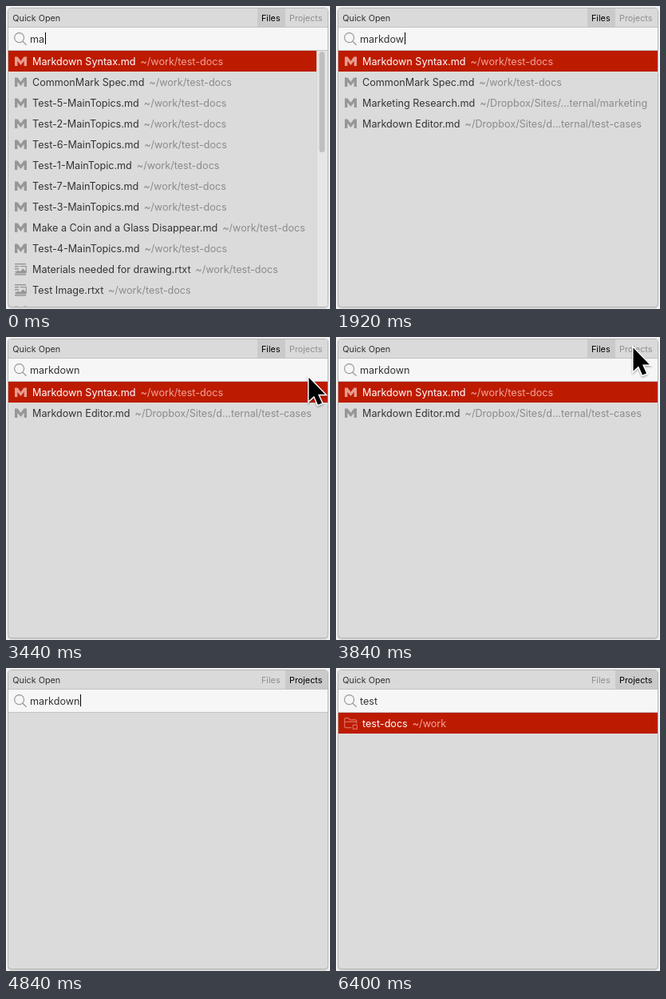
Write an HTML page that moves like this. It is 406x379 px and loops after 6.68 s.

```html
<!DOCTYPE html>
<html lang="en">
<head>
<meta charset="utf-8">
<title>Quick Open</title>
<style>
html, body { margin: 0; width: 100%; height: 100%; overflow: hidden; background: #f1f1f1; }
svg { display: block; width: 406px; height: 379px; }
text { font: 12.6px Inter, "Open Sans", sans-serif; fill: #343434; white-space: pre; }
.small { font-size: 10.8px; fill: #303030; }
.tab text { fill: #8f8f8f; }
.tab rect { fill: none; }
.tab.on text { fill: #000; }
.tab.on rect { fill: #cacaca; }
.path { fill: #8b8b8b; }
.icon { color: #979797; }
.picked text { fill: #fff; }
.picked .path { fill: #f0a497; }
.picked .icon { color: #e99a8c; }
.picked .dir { color: #dd6f5d; }
</style>
</head>
<body>
<svg viewBox="0 0 406 379">
  <defs>
    <clipPath id="frame"><rect x="3" y="3" width="400" height="373" rx="3"/></clipPath>
    <filter id="soft" x="-50%" y="-50%" width="200%" height="200%">
      <feDropShadow dx="0" dy="1.5" stdDeviation="1.2" flood-opacity=".35"/>
    </filter>
    <g id="md"><path fill="currentColor" d="M11 19V7.5h3.6l3.9 5.2 3.9-5.2H26V19h-3.4v-6.3l-4.1 5.2-4.1-5.2V19z"/></g>
    <g id="rtxt" fill="none" stroke="currentColor">
      <path stroke-width="1.4" d="M11 6.7h14M11 9.7h5M11 12.7h5M11 20h14"/>
      <path stroke-width="1.2" d="M17.6 9.6h7.6v6.8H11.5"/>
      <path fill="currentColor" stroke="none" d="M11 18.4l4.2-4 2.6 2 3.2-4.2 4.6 4.4v1.8z"/>
    </g>
    <g id="dir" fill="none" stroke="currentColor" stroke-width="1.2">
      <path d="M19.5 18.6h-7.4q-1.4 0-1.4-1.4V8q0-1.3 1.3-1.3h3.6l1.7 2.1h7q1.4 0 1.4 1.4v3.3M10.8 11.3h14.8"/>
      <rect x="21.2" y="15.2" width="5.2" height="5.2" rx="1"/>
    </g>
  </defs>
  <rect x="2" y="3" width="402" height="375.4" rx="4.5" fill="#d0d0d0"/>
  <rect x="2.5" y="2.5" width="401" height="374" rx="4" fill="#dbdbdb" stroke="#b5b5b5"/>
  <g clip-path="url(#frame)">
    <rect x="3" y="3" width="400" height="23" fill="#dadada"/>
    <text class="small" x="8.3" y="19">Quick Open</text>
    <g class="tab" id="files"><rect x="315" y="3" width="35" height="23"/><text class="small" x="320" y="19">Files</text></g>
    <g class="tab" id="projects"><rect x="350" y="3" width="53" height="23"/><text class="small" x="355" y="19">Projects</text></g>
    <rect x="3" y="26" width="400" height="30" fill="#c2c2c2"/>
    <rect x="3" y="27" width="400" height="28" fill="#f6f6f6"/>
    <path d="M21 44.3l4.6 4.4M22.6 39.6a6 6 0 1 1-12 0a6 6 0 1 1 12 0z" fill="none" stroke="#999" stroke-width="1.2"/>
    <text id="query" x="30" y="46"></text>
    <rect id="caret" y="33" width="1" height="15" fill="#000"/>
    <g id="lists"></g>
    <g id="scroll">
      <rect x="389" y="56" width="14" height="320" fill="#e6e6e6"/>
      <rect x="389" y="56" width="1" height="320" fill="#d6d6d6"/>
      <rect x="392.5" y="57" width="7" height="126" rx="3.5" fill="#bfbfbf"/>
    </g>
  </g>
  <path id="pointer" filter="url(#soft)" d="M0 0v29l6.6-6 4.9 11 5-2.1-5-10.9h8.8z" stroke="#fff" stroke-width="2.8" paint-order="stroke"/>
  <circle id="ring" cx="372" cy="16.5" fill="#999" fill-opacity=".6" stroke="#fff" stroke-width="2.4"/>
</svg>
<script>
const LOOP = 6680;
const $ = id => document.getElementById(id);
const docs = '~/work/test-docs';
const md = (name, path = docs) => ['md', name + '.md', path];
const topics = n => md(`Test-${n}-MainTopic${n === 1 ? '' : 's'}`);
const dir = (name, path) => ['dir', name, path];

const syntax = md('Markdown Syntax');
const spec = md('CommonMark Spec');
const editor = md('Markdown Editor', '~/Dropbox/Sites/d...ternal/test-cases');
const work = dir('test-docs', '~/work');

const results = {
  ma: [syntax, spec, ...[5, 2, 6, 1, 7, 3].map(topics),
    md('Make a Coin and a Glass Disappear'), topics(4),
    ['rtxt', 'Materials needed for drawing.rtxt', docs],
    ['rtxt', 'Test Image.rtxt', docs], ['md', '', '']],
  mark: [syntax, spec, md('Marketing Research', '~/Dropbox/Sites/...ternal/marketing'), editor],
  markdown: [syntax, editor],
  none: [],
  projects: [work, dir('dn-docs-internal', '~/Dropbox/Sites'), dir('06-Writing', '~/Dropbox')],
  test: [work]
};

const row = ([icon, name, path], i) => `
  <g transform="translate(0 ${56 + 26 * i})" class="${i ? '' : 'picked'}">
    ${i ? '' : '<rect x="3" width="400" height="26" fill="#bd1b00"/>'}
    <use href="#${icon}" class="icon ${icon}"/>
    <text x="33" y="18">${name}<tspan class="path" dx="6">${path}</tspan></text>
  </g>`;
$('lists').innerHTML = Object.entries(results)
  .map(([key, rows]) => `<g id="list-${key}">${rows.map(row).join('')}</g>`).join('');

// Each step is [start time, value].
const lists = [[0, 'ma'], [840, 'mark'], [2160, 'markdown'], [4240, 'none'], [5240, 'projects'], [5880, 'test']];
const typed = (word, from, start, gap) =>
  [...word.slice(from)].map((_, i) => [start + gap * i, word.slice(0, from + i + 1)]);
const erased = (word, start, gap) =>
  [...word].map((_, i) => [start + gap * i, word.slice(0, word.length - i - 1)]);
const queries = [[0, 'ma'], ...typed('mark', 2, 680, 280), ...typed('markdown', 4, 1640, 120),
  ...erased('markdown', 4920, 40), ...typed('test', 0, 5600, 80)];
const blinks = [0, 480, 680, 1480, 1640, 2520, 3000, 3400, 3880, 4240, 4720, 6340]
  .map((time, i) => [time, i % 2 === 0]);

const linear = p => p;
const out = p => p * (2 - p);
const smooth = p => p * p * (3 - 2 * p);
// Pointer stops: time, x, y, easing towards the stop.
const stops = [
  [3140, 410, 70, linear], [3440, 379.5, 51, linear], [3720, 372.5, 13.5, out],
  [3840, 372.5, 13.5, linear], [4040, 372.5, 15.5, smooth],
  [4380, 372.5, 15.5, linear], [4860, 412, 80, smooth]
];

const at = (steps, t) => steps.filter(s => s[0] <= t).pop()[1];
const show = (el, on) => { el.style.display = on ? '' : 'none'; };

function movePointer(t) {
  const i = stops.findIndex(s => s[0] > t);
  show($('pointer'), i > 0);
  if (i < 1) return;
  const [t0, x0, y0] = stops[i - 1];
  const [t1, x1, y1, ease] = stops[i];
  const p = ease((t - t0) / (t1 - t0));
  $('pointer').setAttribute('transform', `translate(${x0 + (x1 - x0) * p} ${y0 + (y1 - y0) * p})`);
}

function drawRing(t) {
  const p = (t - 4240) / 280;
  const on = p >= 0 && p < 1;
  show($('ring'), on);
  if (!on) return;
  $('ring').setAttribute('r', 4.6 + 8 * p);
  $('ring').setAttribute('opacity', 1 - p);
}

function draw(t) {
  const list = at(lists, t);
  for (const key in results) show($('list-' + key), key === list);
  show($('scroll'), list === 'ma');

  const query = $('query');
  const value = at(queries, t);
  if (query.textContent !== value) query.textContent = value;
  const width = value ? query.getComputedTextLength() : 0;
  $('caret').setAttribute('x', Math.ceil(30 + width));
  show($('caret'), at(blinks, t));

  const inProjects = t >= 4240;
  $('files').classList.toggle('on', !inProjects);
  $('projects').classList.toggle('on', inProjects);
  movePointer(t);
  drawRing(t);
}

const start = performance.now();
function tick() {
  draw((performance.now() - start) % LOOP);
  requestAnimationFrame(tick);
}
tick();
</script>
</body>
</html>
```
